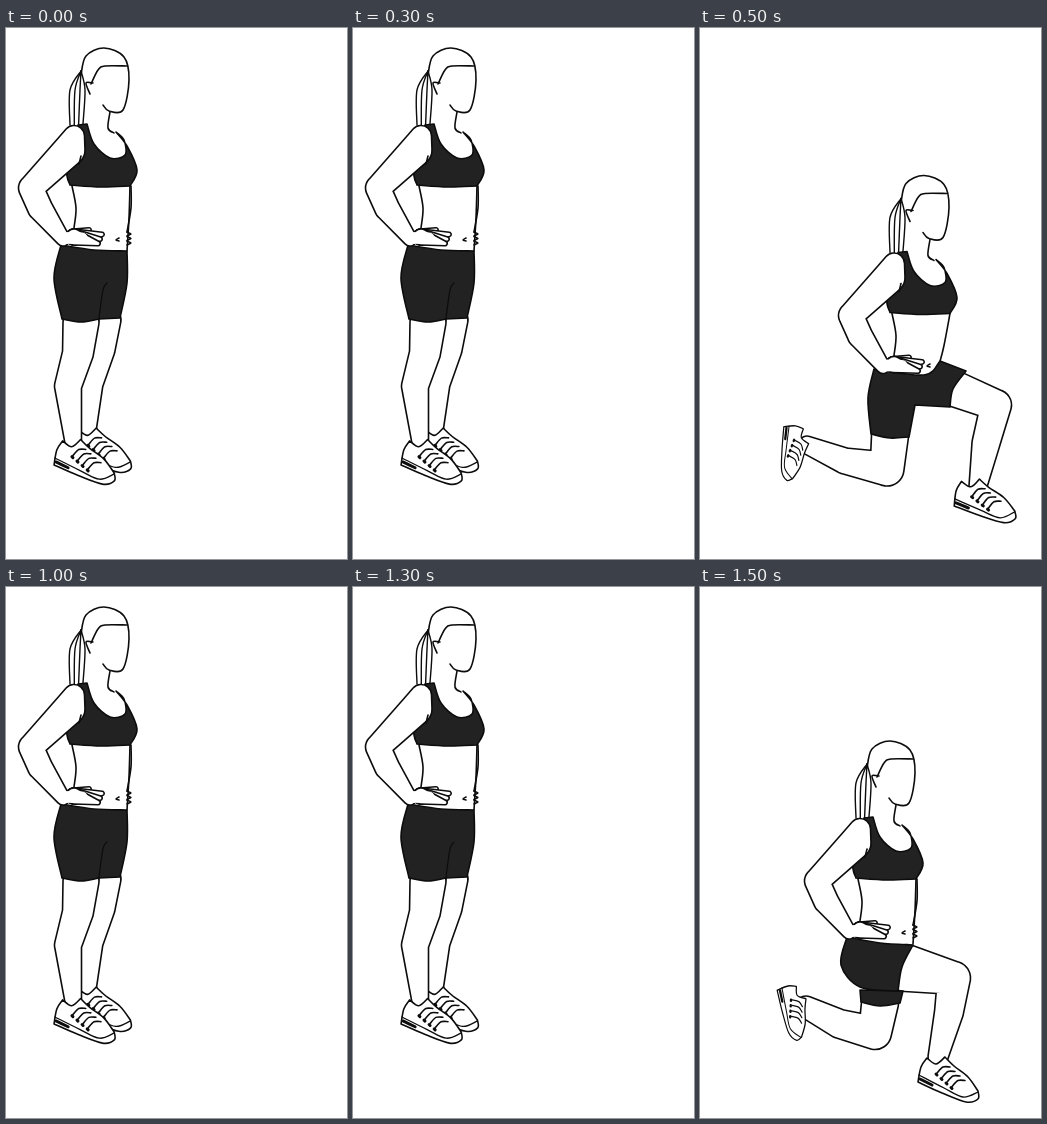
Animation of 341 by 531 pixels, one loop 2 s. Source, as an HTML page with a canvas:

```html
<!DOCTYPE html>
<html lang="en">
<head>
<meta charset="utf-8">
<title>Alternating lunges</title>
<style>
html, body { margin: 0; width: 100%; height: 100%; overflow: hidden; background: #fff; }
canvas { display: block; }
</style>
</head>
<body>
<canvas id="stage" width="341" height="531"></canvas>
<script>
const ctx = document.getElementById('stage').getContext('2d');
const INK = '#0c0c0c', CLOTH = '#222', SKIN = '#fff', LINE = 1.6;

// Smooth curve through "x y,x y,..."; "|" makes a corner at the preceding point.
function curve(text, fill, width = LINE) {
  const runs = text.split('|').map(run => run.split(',').map(p => p.split(' ').map(Number)));
  let pen = runs[0][0];
  ctx.beginPath();
  ctx.moveTo(...pen);
  for (const run of runs) {
    const pts = [pen, ...run.filter(p => p !== pen)];
    for (let i = 0; i < pts.length - 1; i++) {
      const b = pts[i], c = pts[i + 1], a = pts[i - 1] || b, d = pts[i + 2] || c;
      ctx.bezierCurveTo(b[0] + (c[0] - a[0]) / 6, b[1] + (c[1] - a[1]) / 6,
                        c[0] - (d[0] - b[0]) / 6, c[1] - (d[1] - b[1]) / 6, ...c);
    }
    pen = pts[pts.length - 1];
  }
  if (fill) {
    ctx.closePath();
    ctx.fillStyle = fill;
    ctx.fill();
  }
  ctx.lineWidth = width;
  ctx.stroke();
}

// Outlined skin stretched over joints [x, y, radius].
function limb(joints, ink = LINE) {
  ctx.beginPath();
  for (let i = 1; i < joints.length; i++) {
    const [x0, y0, r0] = joints[i - 1], [x1, y1, r1] = joints[i];
    const dx = x1 - x0, dy = y1 - y0, dir = Math.atan2(dy, dx);
    const tangent = Math.acos((r0 - r1) / Math.hypot(dx, dy)), inset = ink / 2;
    ctx.moveTo(x0 + (r0 - inset) * Math.cos(dir + tangent), y0 + (r0 - inset) * Math.sin(dir + tangent));
    ctx.arc(x0, y0, r0 - inset, dir + tangent, dir - tangent + 2 * Math.PI);
    ctx.arc(x1, y1, r1 - inset, dir - tangent, dir + tangent);
    ctx.closePath();
  }
  ctx.lineWidth = 2 * ink;
  if (ink) ctx.stroke();
  ctx.fillStyle = SKIN;
  ctx.fill();
}

function at(x, y, draw, degrees = 0, sx = 1, sy = 1) {
  ctx.save();
  ctx.translate(x, y);
  ctx.rotate(degrees * Math.PI / 180);
  ctx.scale(sx, sy);
  draw();
  ctx.restore();
}

// Origin at the heel, toe to the right.
function shoe() {
  curve('9 -21,3 -12,0 3|24 14,48 23,60 20,60 12|50 -2,36 -13,27 -22|18 -15,9 -21', SKIN);
  curve('1 -4,26 9,45 18,60 13', null, 1.3);
  curve('2 0,14 6', null, 3);
  for (let i = 0; i < 4; i++) {
    const x = 19 + 5 * i, y = -6 + 4.5 * i;
    curve(`${x} ${y},${x + 6} ${y - 6},${x + 13} ${y - 6}`);
    curve(`${x - 1} ${y + 1},${x} ${y + 2}`, null, 3);
  }
}

function head() {
  for (let i = 0; i < 4; i++) {
    curve(`75 43,${64 + 5 * i} 62,${64 + 4.3 * i} 97`, null, 1.4);
  }
  curve('75 47,80 28,98 20,118 29,123 52,117 82,103 83,97 77');
  curve('121 38,99 38,92 42,85 56');
  curve('87 55,80 55,84 66');
  curve('104 84,102 100,108 105');
}

function arm() {
  limb([[68, 108, 10.5], [63, 122, 16], [25, 160, 12.5], [34, 180, 12.5], [57, 211, 7]]);
  curve('75 128,73 136');
  for (let i = 0; i < 4; i++) {
    limb([[68, 209, 8], [i ? 98 - 2 * i : 83, 202 + 4.5 * i, 2.2]]);
  }
  limb([[57, 210, 6], [76, 210, 5.5]], 0);
}

function backArm() {
  curve('125 158,125 180,121 204');
  for (let y = 206; y < 219; y += 4.5) curve(`121 ${y - 2},125 ${y},121 ${y + 2}`);
}

function upperBody(waist) {
  head();
  curve('72 97,81 96|88 116,104 130,119 127,118 112,110 104|121 118,131 142,124 158|95 159,64 157|61 141,72 97', CLOTH);
  curve('66 158,70 180,68 200');
  curve('124 158,' + waist);
  arm();
}

function navel(x, y) {
  curve(`${x + 2} ${y - 2},${x - 1} ${y},${x + 2} ${y + 1}`);
}

function upright() {
  backArm();
  upperBody('123 190,121 223');
  navel(111, 212);
}

function standing() {
  limb([[104, 292, 11], [98, 322, 11], [86, 356, 11], [82, 410, 7]]);
  at(64, 423, shoe, -2);
  limb([[75, 294, 18], [72, 325, 15.5], [62, 358, 13.5], [67, 412, 8.5]]);
  at(48, 434, shoe, -1);
  curve('55 217,48 250,56 291|75 294,93 291|114 290|121 255,121 223|88 222,55 217', CLOTH);
  curve('93 290,97 262,101 255', null, 1.2);
  upright();
}

function lungeFar() {
  limb([[190, 408, 18.5], [187, 441, 17], [145, 433, 13], [107, 417, 9]]);
  at(86, 398, shoe, 73, 0.87, 0.75);
  limb([[255, 361, 18], [296, 377, 15.5], [286, 415, 14], [278, 458, 9]]);
  at(254, 475, shoe, -4);
  curve('174 341,168 370,171 406|190 410,209 409|215 377|250 379|253 361,266 343|240 333|224 347,174 341', CLOTH);
  at(126, 127.5, () => upperBody('118 190,114 206'));
  navel(228, 338);
}

function lungeNear() {
  limb([[180, 416, 18.5], [175, 446, 16.5], [140, 437, 14.5], [106, 420, 11]]);
  at(79, 402, shoe, 55, 0.87, 0.75);
  limb([[206, 381, 23.5], [254, 391, 16.5], [249, 425, 14.5], [238, 470, 10]]);
  at(218, 492, shoe);
  curve('160 403,161 415|180 419,200 416|203 404|160 403', CLOTH);
  curve('147 350,141 378,160 400,198 404|202 380,213 358|180 356,147 350', CLOTH);
  at(92, 134, upright);
}

const poses = [standing, lungeFar, standing, lungeNear];

function frame() {
  ctx.fillStyle = '#fff';
  ctx.fillRect(0, 0, 341, 531);
  ctx.strokeStyle = INK;
  ctx.lineCap = ctx.lineJoin = 'round';
  poses[Math.floor(performance.now() / 500) % poses.length]();
  requestAnimationFrame(frame);
}
frame();
</script>
</body>
</html>
```
